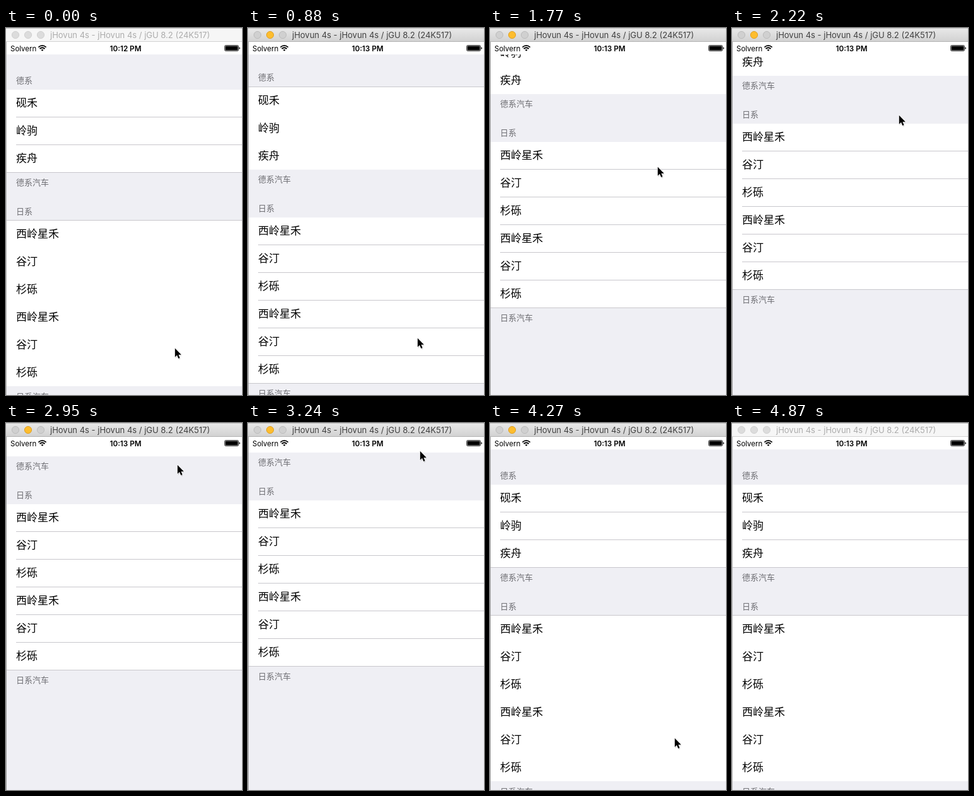
An HTML page that plays this animation: 374x583 px, repeating every 4.97 s.

```html
<!DOCTYPE html>
<html lang="zh-CN">
<head>
<meta charset="utf-8">
<title>Grouped list</title>
<style>
  html, body { margin: 0; width: 100%; height: 100%; overflow: hidden; background: #efeff4; }
  svg { display: block; width: 100vw; height: 100vh; }
  text { font-family: Inter, Roboto, sans-serif; white-space: pre; }
  .row, .note { font-family: "Noto Sans CJK SC", "Noto Sans CJK", "Noto Sans CJK JP", sans-serif; }
  .row { font-size: 17px; fill: #000; }
  .note { font-size: 13px; fill: #6d6d72; }
</style>
</head>
<body>
<svg viewBox="0 0 374 583">
  <defs>
    <clipPath id="view"><rect x="1" y="42" width="373" height="541"/></clipPath>
    <linearGradient id="bar" x1="0" y1="0" x2="0" y2="1">
      <stop offset="0" stop-color="#e9e9e9"/>
      <stop offset="1" stop-color="#d1d1d1"/>
    </linearGradient>
  </defs>

  <rect width="374" height="583" fill="#efeff4"/>
  <g clip-path="url(#view)"><g id="list"></g></g>

  <rect y="22" width="374" height="20" fill="#fff"/>
  <text x="7" y="36.5" font-size="11.5">Solvern</text>
  <g fill="none" stroke="#000" stroke-width="1.8">
    <path d="M51.4 30.6Q57.5 25.2 63.6 30.6"/>
    <path d="M53.5 33Q57.5 29.4 61.5 33"/>
    <path d="M57.5 36.8L55.5 34.7Q57.5 33.1 59.5 34.7Z" fill="#000" stroke="none"/>
  </g>
  <text id="clock" x="189.5" y="36.5" font-size="11.7" font-weight="600" text-anchor="middle"></text>
  <rect x="346.5" y="27.5" width="22" height="9" rx="1.8" fill="none" stroke="#000" stroke-opacity=".75"/>
  <rect x="347.5" y="28.5" width="20" height="7" rx=".6"/>
  <path d="M369.5 30.2Q371 30.6 371 32T369.5 33.8Z"/>

  <rect id="edge" y="22" width="1" height="561"/>
  <rect id="head" width="374" height="22"/>
  <rect id="rule" y="21" width="374" height="1"/>
  <rect width="374" height="1" fill="#c4c4c4"/>
  <g id="lights"></g>
  <text id="title" x="70" y="16" font-size="13">jHovun 4s - jHovun 4s / jGU 8.2 (24K517)</text>

  <g id="cursor">
    <path d="M1 1.5V15.5L4.2 12.5L6.4 17.6L8.8 16.6L6.6 11.6H11Z" fill="#000" opacity=".18" transform="translate(.6 1.2)"/>
    <path d="M.8.8V14.8L4 11.8L6.2 16.9L8.6 15.9L6.4 10.9H10.8Z" fill="#000" stroke="#fff" stroke-width="1.2" paint-order="stroke"/>
  </g>
</svg>
<script>
const LOOP = 4970;
const NS = 'http://www.w3.org/2000/svg';
const $ = id => document.getElementById(id);

function add(parent, tag, attrs, text) {
  const el = document.createElementNS(NS, tag);
  for (const k in attrs) el.setAttribute(k, attrs[k]);
  if (text) el.textContent = text;
  return parent.appendChild(el);
}
const set = (id, attr, value) => $(id).setAttribute(attr, value);

// time, cursor x, cursor y, list offset
const STEPS = [
  [0, 267, 508, 0], [140, 268, 513, 0], [290, 268, 518, 0], [430, 268, 508, 0],
  [880, 268, 492, 5], [1030, 268, 468, 18], [1180, 268, 434, 35], [1330, 268, 385, 58],
  [1480, 267, 330, 83], [1620, 266, 273, 106], [1770, 265, 220, 125], [1920, 264, 176, 141],
  [2070, 264, 156, 148], [2220, 264, 138, 154], [2360, 265, 122, 159], [2510, 267, 107, 164],
  [2660, 269, 92, 169], [2800, 270, 79, 173], [2950, 271, 66, 177], [3090, 272, 48, 182],
  [3240, 272, 44, 183],
  [3680, 276, 82, 88], [3830, 279, 149, 27], [3980, 283, 262, 6], [4120, 288, 385, 0],
  [4270, 292, 500, 0], [4420, 296, 600, 0]
];

const list = $('list');
add(list, 'rect', { x: 0, y: 98, width: 374, height: 132, fill: '#fff' });
add(list, 'rect', { x: 0, y: 306, width: 374, height: 263, fill: '#fff' });
// Keeps the strip above the first header grey
const firstRows = add(list, 'g', {});

function rows(parent, names, y) {
  names.forEach((name, i) => add(parent, 'text', { class: 'row', x: 16, y: y + 44 * i }, name));
}
function note(text, y) {
  add(list, 'text', { class: 'note', x: 16, y }, text);
}
function line(parent, y, x = 0) {
  add(parent, 'rect', { x, y, width: 374 - x, height: 1, fill: '#c8c7cc' });
}

const trio = ['西岭星禾', '谷汀', '杉砾'];
rows(firstRows, ['砚禾', '岭驹', '疾舟'], 125);
rows(list, [...trio, ...trio], 333);
note('德系', 88);
note('德系汽车', 250);
note('日系', 296);
note('日系汽车', 590);

// Half-point hairlines: one set shows at rest, the other while scrolled
const restLines = add(list, 'g', {});
const dragLines = add(list, 'g', {});
line(restLines, 141, 16);
line(restLines, 185, 16);
line(restLines, 229);
line(restLines, 305);
line(dragLines, 98);
for (let i = 0; i < 5; i++) line(dragLines, 349 + 44 * i, 16);
line(dragLines, 569);

const lights = [15, 35, 55].map(cx => add($('lights'), 'circle', { cx, cy: 11, r: 5.6 }));

function draw(t) {
  const [, x, y, offset] = STEPS.filter(s => s[0] <= t).pop();
  const active = t >= 880 && t < 4870;
  const moved = offset > 0;

  list.setAttribute('transform', `translate(0 ${-offset})`);
  firstRows.setAttribute('transform', `translate(0 ${moved ? 1 : 0})`);
  restLines.setAttribute('visibility', moved ? 'hidden' : 'visible');
  dragLines.setAttribute('visibility', moved ? 'visible' : 'hidden');

  set('clock', 'visibility', 'visible');
  $('clock').textContent = t < 290 ? '10:12 PM' : '10:13 PM';
  set('head', 'fill', active ? 'url(#bar)' : '#f6f6f6');
  set('rule', 'fill', active ? '#b3b3b3' : '#d3d3d3');
  set('edge', 'fill', active ? '#9c9c9c' : '#b8b8b8');
  set('title', 'fill', active ? '#404040' : '#acacac');
  lights.forEach((c, i) => {
    const lit = active && i === 1;
    c.setAttribute('fill', lit ? '#fdbd2e' : active ? '#d0d0d0' : '#dcdcdc');
    c.setAttribute('stroke', lit ? '#dfa023' : active ? '#bcbcbc' : '#d0d0d0');
  });
  set('cursor', 'transform', `translate(${x} ${y})`);
}

const start = performance.now();
function tick() {
  draw((performance.now() - start) % LOOP);
  requestAnimationFrame(tick);
}
draw(0);
requestAnimationFrame(tick);
</script>
</body>
</html>
```
